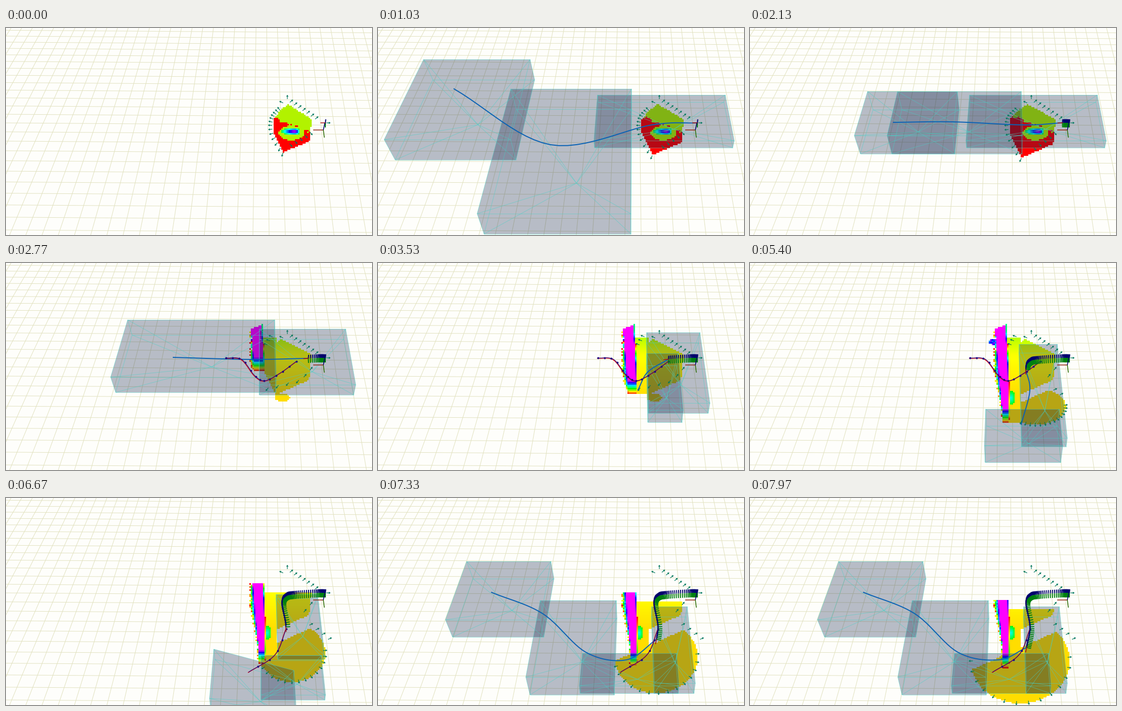
Recreate the animation shown at these times as a matplotlib script. Size 722x408 px, loop 8 s.

```python
import matplotlib.pyplot as plt
import numpy as np
from matplotlib.animation import FuncAnimation
from matplotlib.collections import LineCollection, PolyCollection
from matplotlib.colors import hsv_to_rgb
from matplotlib.path import Path

W, H = 722, 408
FRAMES, STEP = 200, 40
PX = 0.72  # one pixel in points
CELL = 3
VX, VY, DEPTH = 505, -780, 54000  # vanishing point and row scale of the ground

NAVY, DGREEN, TEAL, PLAN = "#00006c", "#008010", "#00785c", "#0a62b4"
LIME, RED = (.70, .95, 0, 1), (1, 0, 0, 1)


def spline(pts, n=12):
    p = np.array(pts, float)
    p = np.vstack([2 * p[0] - p[1], p, 2 * p[-1] - p[-2]])
    s = np.linspace(0, 1, n, endpoint=False)[:, None]
    out = [b + s * ((c - a) + s * ((2 * a - 5 * b + 4 * c - d)
           + s * (3 * b - a - 3 * c + d))) / 2
           for a, b, c, d in zip(p, p[1:], p[2:], p[3:])]
    return np.vstack(out + [p[-2:-1]])


def along(a, b, n):
    return np.linspace(a, b, n)


# ---- corridor polyhedra: boxes seen in the ground's perspective ----------
def prism(x0, x1, y0, y1, h, slope=0):
    """Eight corners: top face first, then the base h pixels lower."""
    top = []
    for x, y in [(x0, y0), (x1, y0), (x1, y1 - h), (x0, y1 - h)]:
        skew = slope * (x - x0) / (x1 - x0)
        top.append((VX + (x - VX) * (y - VY) / (y0 - VY), y + skew))
    top = np.array(top, float)
    base = np.column_stack([VX + (top[:, 0] - VX) * (1 - .0011 * h), top[:, 1] + h])
    return np.vstack([top, base])


def hull(pts):
    a = np.linspace(0, 2 * np.pi, 240)
    far = (pts @ np.array([np.cos(a), np.sin(a)])).argmax(0)
    return pts[far[np.r_[True, far[1:] != far[:-1]]]]


def wires(p):
    hub = p.mean(0) + np.ptp(p, axis=0) * (.08, .15)
    edges = [(p[i], p[j]) for k in range(4)
             for i, j in [(k, (k + 1) % 4), (k + 4, (k + 1) % 4 + 4), (k, k + 4)]]
    return edges + [(hub, v) for v in p]


CORRIDOR = [(232, 409, 125, 248, 36), (291, 535, 125, 248, 36), (433, 685, 132, 236, 14)]
AHEAD = [(283, 186), (400, 185), (540, 191)]

# start time, boxes, goal-to-robot plan
SCENES = [
    (0, [], None),
    (40, CORRIDOR, AHEAD),
    (870, [(90, 300, 62, 260, 40), (262, 500, 120, 406, 40), CORRIDOR[2]],
     [(150, 120), (340, 230), (540, 191)]),
    (1240, CORRIDOR, AHEAD),
    (2560, [(240, 530, 112, 255, 30), (500, 670, 130, 260, 20)], [(330, 186), (480, 190)]),
    (2880, [(530, 635, 137, 296, 20), (530, 592, 178, 314, 24)], [(513, 250), (532, 215)]),
    (3960, [(526, 611, 139, 298, 6), (522, 590, 178, 277, 30)], [(513, 250), (530, 222)]),
    (4920, [(531, 606, 160, 362, 17), (465, 610, 288, 393, 33)], [(535, 318), (552, 252)]),
    (6000, [(533, 615, 190, 318, 8), (503, 622, 310, 398, 10),
            (410, 568, 298, 415, 20, 42)], None),
    (7040, [(175, 341, 125, 274, 34), (320, 470, 202, 388, 35),
            (403, 589, 306, 385, 15), (540, 610, 214, 385, 20)],
     [(224, 186), (325, 228), (410, 304), (490, 319)]),
]
BOXES = [[prism(*b) for b in s[1]] for s in SCENES]

# ---- robot path and tracked trajectories ---------------------------------
TRACK = spline([(630, 187), (614, 187), (570, 190), (552, 194),
                (544, 210), (552, 258), (545, 298)])
TRACK_T = [1600, 2130, 3530, 4430, 5400, 6670, 7970]
HEADING = np.gradient(TRACK, axis=0)
HEADING /= np.linalg.norm(HEADING, axis=1)[:, None]
LEFT = np.column_stack([HEADING[:, 1], -HEADING[:, 0]])

FIRST = spline([(433, 187), (464, 190), (490, 222), (510, 232), (540, 217), (572, 194)])
SECOND = spline([(552, 258), (530, 309), (478, 343)])
EMPTY = np.empty((0, 2))

# ---- voxel map -------------------------------------------------------------
X0, Y0, NX, NY = 420, 120, 81, 96
gx, gy = np.meshgrid(X0 + CELL * (np.arange(NX) + .5), Y0 + CELL * (np.arange(NY) + .5))
NOISE = np.random.default_rng(4).uniform(-1, 1, (NY, NX))
BLOB = np.array([(556, 150), (603, 180), (599, 223), (547, 245),
                 (528, 207), (528, 180), (541, 163)], float)


def rainbow(v):
    """Height colours: 0 red, through green and blue, to 1 magenta."""
    hsv = np.stack([np.clip(v, 0, 1) * .833, np.ones_like(v), np.ones_like(v)], -1)
    return np.dstack([hsv_to_rgb(hsv), np.ones_like(v)])


def paint(img, mask, color):
    img[mask] = color[mask] if np.ndim(color) == 3 else color


def grown(g):
    p = BLOB.copy()
    p[:, 0] = 603 - (603 - p[:, 0]) * (1 + .2 * g)
    p[:, 1] += np.maximum(p[:, 1] - 200, 0) * .24 * g
    return p


def inside(poly):
    cells = np.column_stack([gx.ravel(), gy.ravel()])
    return Path(poly).contains_points(cells).reshape(gx.shape)


def lobe(t):
    """Centre and radii of the floor seen after the turn."""
    keys = [4400, 5400, 6670, 7970]
    return [np.interp(t, keys, v) for v in
            ([545, 564, 564, 533], [265, 283, 306, 321], [15, 59, 66, 98], [8, 36, 58, 84])]


def early_map(img, t):
    g = min(t / 2000, 1)
    blob = inside(grown(g))
    paint(img, blob, LIME)
    ring = np.hypot((gx - 563) / 25, (gy - 207) / 14)
    low = gy + 4 * NOISE > 178 + (gx - 528) * .37
    paint(img, blob & low & (ring > 1), RED)
    d = np.hypot((gx - 570) / np.where(gx < 570, 27, 10), (gy - 204) / 7)
    paint(img, d < 1, rainbow(1.05 - .6 * d))


def late_map(img, t):
    top = np.interp(t, [5400, 6670, 7970], [148, 187, 220])
    yb = np.interp(t, [2500, 3530, 4430, 5400, 6670, 7970], [170, 232, 262, 288, 300, 308])
    cx, cy, rx, ry = lobe(t)
    strip = (abs(gx - 520) < 13) & (gy < yb + 26)
    floor = inside(grown(1.4)) | strip
    floor |= (np.hypot((gx - cx) / rx, (gy - cy) / ry) < 1) & (gy > yb + .45 * (505 - gx))
    hue = np.interp(gy, [150, 180, 260], [.21, .17, .145]) / .833
    paint(img, floor & (gy > top), rainbow(hue))
    if t > 4200:
        d = np.hypot((gx - 515) / 8, (gy - 266) / 14)
        paint(img, d < 1, rainbow(.4 + .2 * (1 - d)))

    # obstacle: magenta core, colours falling off around it
    axis = np.interp(gy, [135, 200, 300], [494, 499, 504])
    half = np.interp(gy, [135, 200, 300], [10, 9, 5.5])
    reach = 2 + 8 * np.exp(-((gy - 215) / 40) ** 2) + 2 * NOISE
    side = np.maximum(abs(gx - axis) - half, 0) / np.where(gx < axis, reach, 3)
    d = np.hypot(side, np.maximum(gy - yb, 0) / 27)
    crown = top - 18 - (gx - 484) * .4 * (top < 160)
    paint(img, (d < 1) & (gy > crown), rainbow(1 - d))
    if 3700 < t < 5900:
        paint(img, np.hypot((gx - 479) / 8, (gy - 155) / 6) < 1, rainbow(.8 + .15 * NOISE))


def voxels(t):
    img = np.zeros((NY, NX, 4))
    (early_map if t < 2560 else late_map)(img, t)
    return img


# ---- surface arrows ----------------------------------------------------------
SHAPE = np.array([(-4, -.6), (1, -.6), (.6, -2.3), (4.4, 0), (.6, 2.3), (1, .6), (-4, .6)])


def arrow(x, y, angle):
    c, s = np.cos(np.radians(angle)), np.sin(np.radians(angle))
    return SHAPE @ np.array([[c, s], [-s, c]]) + (x, y)


def row(pts, angle):
    return [arrow(x, y, angle) for x, y in pts]


def arrows(t):
    out = [arrow(555, 136, -90), arrow(543, 146, -155), arrow(636, 187, 0)]
    out += row(along((563, 144), (613, 177), 7), -40)
    if t < 2560:
        g = min(t / 2000, 1)
        for x, y in spline(grown(g)[3:], 4):
            a = np.arctan2(y - 195, x - 565)
            out.append(arrow(x + 5 * np.cos(a), y + 5 * np.sin(a), np.degrees(a)))
        out += row(along((562, 231 + 7 * g), (602, 208), 5), 50)
    else:
        if t < 5700:
            out += row(along((522, 144), (512, 160), 3), -160)
        out += row(along((590, 222), (602, 208), 2), -50)
        if t < 4800:
            out += row(along((515, 249), (575, 234), 4), 130)
    seen = int(np.interp(t, [4600, 5700], [0, 4]))
    out += row(along((602, 249), (639, 277), 4)[:seen], -25)
    if t > 4800:
        cx, cy, rx, ry = lobe(t)
        last = np.interp(t, [5400, 6670, 7970], [120, 150, 180])
        for a in np.radians(np.linspace(-5, last, 14)):
            x, y = cx + rx * np.cos(a), cy + ry * np.sin(a)
            out.append(arrow(x, y, np.degrees(a)))
    return out


# ---- stage ---------------------------------------------------------------------
fig = plt.figure(figsize=(W / 100, H / 100), dpi=100, facecolor="#fefefb")
ax = fig.add_axes([0, 0, 1, 1])
ax.axis("off")

grid = [[(0, y), (W, y + 5)] for y in VY + DEPTH / (55.84 + np.arange(-12, 16))]
for j in np.arange(-28, 14) + .44:
    grid.append([(VX + j * 32 * (y - VY) / (H - VY), y) for y in (0, H)])
ax.add_collection(LineCollection(grid, colors="#e2e2c0", linewidths=PX, zorder=1))


def lines(color, width, z):
    return ax.add_collection(LineCollection([], colors=color, linewidths=width * PX, zorder=z))


def curve(color, width, z, **kw):
    return ax.plot([], [], color=color, lw=width * PX, zorder=z, **kw)[0]


voxel_img = ax.imshow(np.zeros((NY, NX, 4)), interpolation="nearest", zorder=2, aspect="auto",
                      extent=(X0, X0 + NX * CELL, Y0 + NY * CELL, Y0))
hulls = ax.add_collection(PolyCollection([], facecolors=[(.04, .11, .27, .29)],
                                         linewidths=0, zorder=3))
wire = lines([(.28, .82, .78, .55)], .9, 4)
plan_line = curve(PLAN, 2, 5)
traj_red = curve("#d70a14", 1.6, 6)
traj_blue = curve("#1e0a82", 1, 7, marker="o", ms=2.6 * PX, markevery=5)
side = lines(DGREEN, 2, 8)
up = lines(NAVY, 2, 9)
nose = curve("#aa0a0a", 1.5, 10)
ax.add_collection(LineCollection(
    [[(626, 201), end] for end in [(606, 201), (628, 216), (629, 187)]],
    colors=["#962d19", "#326e0a", NAVY], linewidths=1.6 * PX, zorder=10))
normals = ax.add_collection(PolyCollection([], facecolors=TEAL, linewidths=0, zorder=11))

ax.set_xlim(0, W)
ax.set_ylim(H, 0)


def draw(i):
    t = i * STEP
    voxel_img.set_data(voxels(t))

    n = int(np.interp(t, TRACK_T, np.arange(len(TRACK_T))) * 12) + 1
    p = TRACK[:n]
    up.set_segments(np.stack([p, p + (.8, -7)], axis=1))
    side.set_segments(np.stack([p, p + LEFT[:n] * 9], axis=1))
    nose.set_data(*np.array([p[-1], p[-1] + HEADING[n - 1] * 9]).T)

    k = sum(s[0] <= t for s in SCENES) - 1
    hulls.set_verts([hull(b) for b in BOXES[k]])
    wire.set_segments([w for b in BOXES[k] for w in wires(b)])
    plan = SCENES[k][2]
    plan_line.set_data(*(spline(plan + [p[-1]]) if plan else EMPTY).T)

    traj = EMPTY if t < 2700 else FIRST if t < 5800 else SECOND
    traj_red.set_data(traj[:, 0], traj[:, 1] + .8)
    traj_blue.set_data(traj[:, 0] + .8, traj[:, 1])

    normals.set_verts(arrows(t))
    return ()


anim = FuncAnimation(fig, draw, frames=FRAMES, interval=STEP, repeat=True, repeat_delay=0,
                     init_func=lambda: draw(0), blit=False)
plt.show()
```
